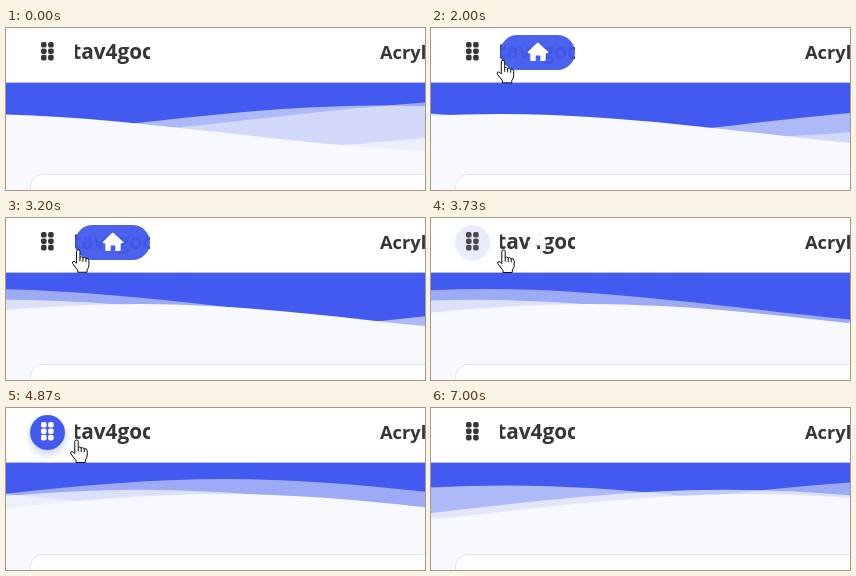
Write an HTML page that moves like this. It is 419x162 px and loops after 7.07 s.

```html
<!DOCTYPE html>
<html lang="zh-Hant">
<head>
<meta charset="utf-8">
<title>Blog header</title>
<style>
  html, body { margin: 0; width: 100%; height: 100%; overflow: hidden; background: #f7f9fe; }
  svg { display: block; width: 100vw; height: 100vh; }
  .latin { font-family: "Open Sans", "Noto Sans", sans-serif; font-weight: 700; fill: #363636; }
  .cjk { font-family: "Noto Sans CJK TC", "Noto Sans CJK", "Noto Sans CJK SC", sans-serif; fill: #363636; }
</style>
</head>
<body>
<svg viewBox="0 0 419 162">
  <defs>
    <path id="wave" d="M-160 44c30 0 58-18 88-18s58 18 88 18 58-18 88-18 58 18 88 18v44h-352z"/>
    <clipPath id="nameBox"><rect x="69" y="4" width="75" height="42"/></clipPath>
    <radialGradient id="glow">
      <stop offset="0.6" stop-color="#425aef" stop-opacity="0.2"/>
      <stop offset="1" stop-color="#425aef" stop-opacity="0"/>
    </radialGradient>
  </defs>

  <rect width="419" height="162" fill="#425aef"/>
  <g id="waves" fill="#f7f9fe" transform="translate(0 66.7) scale(5.9 2.143) translate(0 -24)"></g>
  <rect x="24.5" y="146.5" width="420" height="60" rx="12" fill="#fff" stroke="#e0e5f6"/>

  <rect width="419" height="54.6" fill="#fff"/>
  <text class="latin" x="374" y="31" font-size="18.3">Acryl</text>
  <g clip-path="url(#nameBox)">
    <text class="latin" x="106.5" y="31" font-size="20.8" text-anchor="middle">tav4goc</text>
  </g>
  <rect id="pill" x="69" y="7" width="75" height="35" rx="17.5" fill="#425aef"/>
  <path id="home" fill="#fff" d="M107 14.5 L117.3 24 Q117.6 25.2 116.3 25.3 H114.7 V32 Q114.7 33 113.7 33 H109.3 V27.5 H104.7 V33 H100.3 Q99.3 33 99.3 32 V25.3 H97.7 Q96.4 25.2 96.7 24 L106 15 Q107 14 108 15 Z"/>

  <g id="disc">
    <circle cx="41.5" cy="29" r="23" fill="url(#glow)"/>
    <circle cx="41.5" cy="24.5" r="17.5" fill="#425aef"/>
  </g>
  <g id="dots"></g>

  <g id="menu">
    <rect x="24" y="57" width="342" height="90" rx="12" fill="#fff"/>
    <text class="cjk" x="41" y="83" font-size="12" opacity="0.6">部落格分支</text>
    <rect x="42" y="107" width="22" height="22" rx="4" fill="#eda58c"/>
    <text class="cjk" x="75" y="124" font-size="16">本尊部落格</text>
    <circle cx="227" cy="118" r="9.5" fill="#0e83cd"/>
    <text class="cjk" x="249" y="124" font-size="16">分身部落格</text>
  </g>

  <g id="cursor" stroke="#000" fill="#fff" stroke-linejoin="round">
    <path id="arrow" stroke-width="0.9" d="M0 0V15.5L3.6 12.2 6 17.8 8.6 16.7 6.2 11.2H11Z"/>
    <path id="hand" stroke-width="0.95" d="M-1.7 1.5Q-1.7 0 0 0T1.7 1.5V7.5Q3.2 6.3 4.7 8Q6.4 6.9 7.7 8.7Q10.7 8 10.7 11V15Q10.7 18 8.8 20V22.5H-.5V20.5L-5.6 13.8Q-6.4 11.6-4.4 11.6Q-3.2 11.6-1.7 13.6ZM1.7 7.5V11.5M4.7 8V12M7.7 8.7V12.4"/>
  </g>
</svg>
<script>
const FPS = 15, FRAMES = 106, LOOP = 7070;
const PAGE_AGE = 27.1; // seconds the waves have already been running
const NS = "http://www.w3.org/2000/svg";
const $ = id => document.getElementById(id);

function add(parent, tag, attrs) {
  const el = document.createElementNS(NS, tag);
  for (const key in attrs) el.setAttribute(key, attrs[key]);
  return parent.appendChild(el);
}

const layers = [
  { y: 0, lead: 2, period: 7, opacity: 0.5 },
  { y: 3, lead: 3, period: 10, opacity: 0.6 },
  { y: 5, lead: 4, period: 13, opacity: 0.7 },
  { y: 7, lead: 5, period: 20, opacity: 1 },
];
for (const layer of layers)
  layer.el = add($("waves"), "use", { href: "#wave", "fill-opacity": layer.opacity });

for (const x of [37.8, 44.9])
  for (const y of [16.8, 23.2, 29.6])
    add($("dots"), "rect", { x: x - 2.8, y: y - 2.8, width: 5.6, height: 5.6, rx: 1.9 });

const bezier = (a, b, u) => 3 * a * u * (1 - u) ** 2 + 3 * b * u * u * (1 - u) + u ** 3;

// cubic-bezier(.55, .5, .45, .5)
function drift(p) {
  let lo = 0, hi = 1;
  for (let i = 0; i < 24; i++) {
    const mid = (lo + hi) / 2;
    if (bezier(0.55, 0.45, mid) < p) lo = mid; else hi = mid;
  }
  return bezier(0.5, 0.5, lo);
}

const ramp = (t, a, b) => Math.min(1, Math.max(0, (t - a) / (b - a)));
const pulse = (t, inA, inB, outA, outB) => ramp(t, inA, inB) * (1 - ramp(t, outA, outB));
const mix = (a, b, k) => Math.round(a + (b - a) * k);

// time, x, y of the pointer tip
const route = [
  [0.8, 104, 104], [1.07, 76, 56], [1.5, 72, 33], [2.67, 72, 31.5], [3.73, 72.5, 32],
  [4.87, 70.5, 32], [5.3, 68, 31], [5.67, 52.5, 30], [6.2, 46, 24], [6.7, 32, 15],
];

function pointer(t) {
  const i = Math.max(1, route.findIndex(stop => stop[0] >= t));
  const [a, b] = [route[i - 1], route[i]];
  const k = ramp(t, a[0], b[0]);
  return [a[1] + (b[1] - a[1]) * k, a[2] + (b[2] - a[2]) * k];
}

const show = (id, opacity) => $(id).setAttribute("opacity", opacity);

function draw(t) {
  for (const { el, y, lead, period } of layers) {
    const p = ((PAGE_AGE + t + lead) / period) % 1;
    el.setAttribute("transform", `translate(${48 - 90 + 175 * drift(p)} ${y})`);
  }

  show("pill", 0.95 * pulse(t, 1.55, 1.85, 3.43, 3.73));
  show("home", pulse(t, 1.55, 1.85, 3.73, 4));

  const hover = pulse(t, 3.7, 4, 5.47, 5.72);
  show("disc", hover);
  const shade = mix(54, 255, hover);
  $("dots").setAttribute("fill", `rgb(${shade},${shade},${shade})`);
  show("menu", pulse(t, 4.9, 5.15, 5.52, 5.82));

  const visible = t >= 0.8 && t < 6.7;
  show("cursor", visible ? 1 : 0);
  if (visible) $("cursor").setAttribute("transform", `translate(${pointer(t)})`);
  const linked = t >= 1.53 && t < 5.5;
  show("hand", linked ? 1 : 0);
  show("arrow", linked ? 0 : 1);
}

const start = performance.now();
function tick() {
  const ms = (performance.now() - start) % LOOP;
  const frame = Math.min(FRAMES - 1, Math.floor((ms + 3.4) * FPS / 1000));
  draw(frame / FPS);
  requestAnimationFrame(tick);
}
tick();
</script>
</body>
</html>
```
